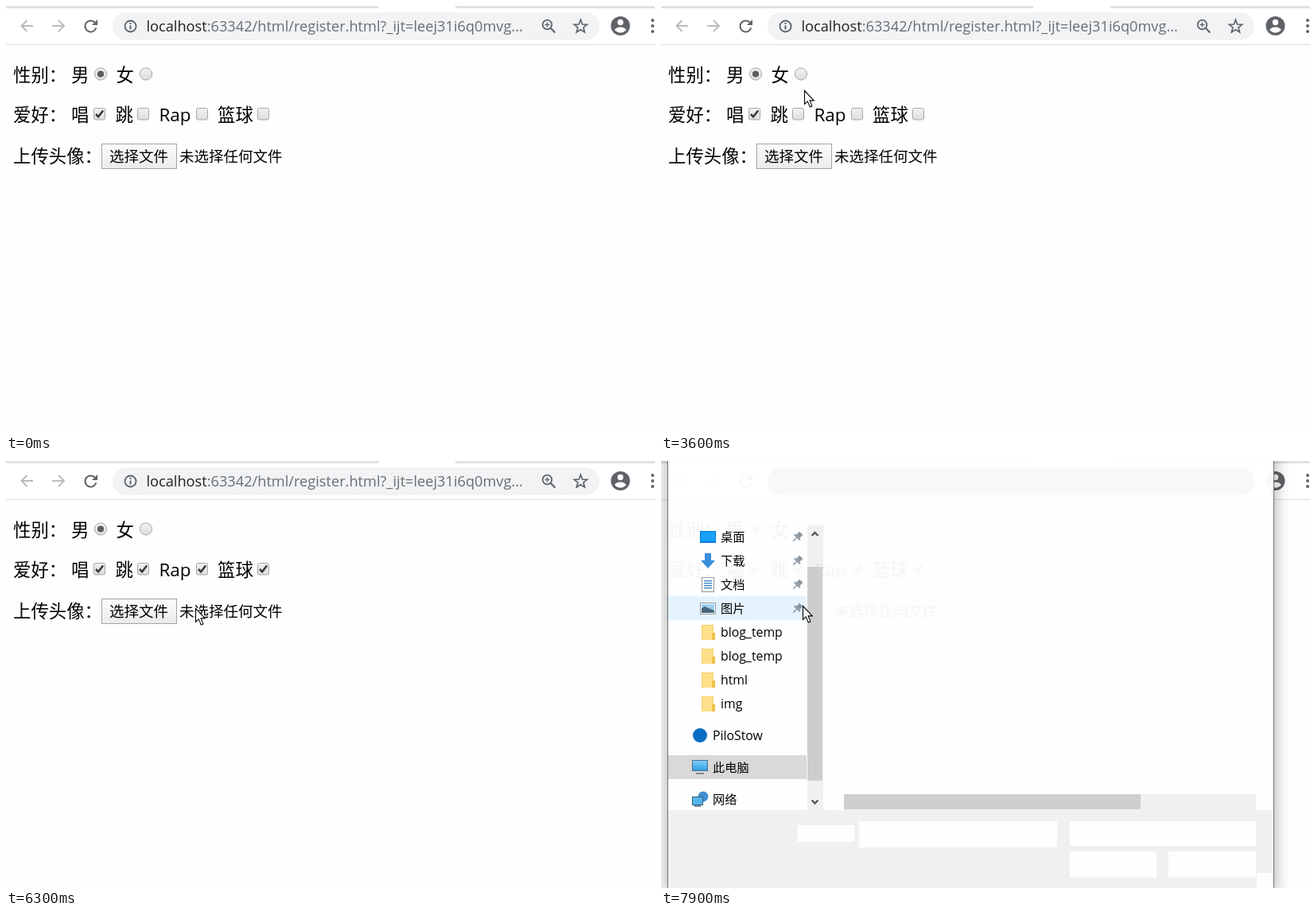
Recreate the animation shown at these times as an HTML page with a canvas. Size 816x537 px, loop 8000 ms.

```html
<!DOCTYPE html>
<html lang="zh-CN">
<head>
<meta charset="utf-8">
<title>Form demo</title>
<style>
  html, body { margin: 0; width: 100%; height: 100%; overflow: hidden; background: #fefefe; }
  canvas { display: block; }
</style>
</head>
<body>
<canvas id="stage" width="816" height="537"></canvas>
<script>
const stage = document.getElementById('stage').getContext('2d');
let ctx = stage;
const FONT = '"Open Sans", "Noto Sans CJK SC", "Noto Sans CJK", sans-serif';
const LOOP = 8000;
const GREY = '#5f6368';

// Pointer waypoints: time, x, y
const path = [
  [700, 804, 13], [800, 620, 45], [900, 435, 80], [1000, 290, 105], [1100, 205, 111],
  [1200, 168, 97], [1500, 169, 87], [2000, 169, 87], [2400, 136, 87], [2700, 119, 86],
  [2800, 119, 86], [3200, 166, 86], [3300, 166, 86], [3700, 184, 113], [4000, 174, 136],
  [4200, 172, 137], [4500, 253, 147], [4800, 247, 137], [5100, 247, 136], [5300, 324, 136],
  [5400, 324, 136], [5600, 320, 134], [6000, 320, 134], [6300, 238, 185], [6600, 178, 182]
];

const lerp = (a, b, k) => a + (b - a) * k;
const ramp = (t, a, b) => Math.max(0, Math.min(1, (t - a) / (b - a)));

function pointerAt(t) {
  if (t < path[0][0]) return null;
  const i = path.findIndex(p => p[0] > t);
  if (i < 0) return path[path.length - 1].slice(1);
  const a = path[i - 1], b = path[i], k = ramp(t, a[0], b[0]);
  return [lerp(a[1], b[1], k), lerp(a[2], b[2], k)].map(Math.round);
}

function rect(x, y, w, h, fill) {
  ctx.fillStyle = fill;
  ctx.fillRect(x, y, w, h);
}

function text(str, x, y, size, fill = '#000') {
  ctx.font = `${size}px ${FONT}`;
  ctx.fillStyle = fill;
  ctx.fillText(str, x, y);
}

function disc(x, y, r, fill) {
  ctx.beginPath();
  ctx.arc(x, y, r, 0, Math.PI * 2);
  ctx.fillStyle = fill;
  ctx.fill();
}

function trace(points, close) {
  ctx.beginPath();
  points.forEach(([x, y]) => ctx.lineTo(x, y));
  if (close) ctx.closePath();
}

function poly(points, fill) {
  trace(points, true);
  ctx.fillStyle = fill;
  ctx.fill();
}

function line(points, color, width = 2) {
  trace(points);
  ctx.strokeStyle = color;
  ctx.lineWidth = width;
  ctx.stroke();
}

function ring(x, y, r, color, width = 2, from = 0, to = Math.PI * 2) {
  ctx.beginPath();
  ctx.arc(x, y, r, from, to);
  ctx.strokeStyle = color;
  ctx.lineWidth = width;
  ctx.stroke();
}

function pill(fill) {
  ctx.beginPath();
  ctx.roundRect(134, 8, 612, 35, 17.5);
  ctx.fillStyle = fill;
  ctx.fill();
}

function shade(y, h, top, bottom) {
  const g = ctx.createLinearGradient(0, y, 0, y + h);
  g.addColorStop(0, top);
  g.addColorStop(1, bottom);
  return g;
}

function drawToolbar() {
  rect(0, 0, 816, 48, '#fff');
  rect(0, 0, 468, 3, '#dee1e6');
  rect(565, 0, 251, 3, '#dee1e6');
  rect(0, 48, 816, 1, '#dadce0');

  line([[34, 25], [20, 25]], '#babcbe');
  line([[26.5, 18], [19.5, 25], [26.5, 32]], '#babcbe');
  line([[58, 25], [72, 25]], '#babcbe');
  line([[66, 18], [73, 25], [66, 32]], '#babcbe');

  ring(106.5, 25.5, 7, GREY, 2, .25, 5.5);
  poly([[115, 17], [115, 24], [108, 24]], GREY);

  pill('#f1f3f4');
  ring(156.5, 25.5, 7, GREY, 1.8);
  rect(155.5, 24.5, 2, 5, GREY);
  rect(155.5, 21, 2, 2, GREY);

  text('localhost', 176.5, 32, 18.2, '#202124');
  const host = ctx.measureText('localhost').width;
  text(':63342/html/register.html?_ijt=leej31i6q0mvg...', 176.5 + host, 32, 18.2, '#6a6e73');

  ring(680.5, 23.5, 5.8, GREY, 1.8);
  line([[685, 28], [690.5, 33.5]], GREY, 2.2);
  line([[677.5, 23.5], [683.5, 23.5]], GREY, 1.4);
  line([[680.5, 20.5], [680.5, 26.5]], GREY, 1.4);

  const star = Array.from({ length: 10 }, (_, i) => {
    const a = i * Math.PI / 5 - Math.PI / 2, r = i % 2 ? 3.7 : 8.6;
    return [722.5 + r * Math.cos(a), 26 + r * Math.sin(a)];
  });
  trace(star, true);
  ctx.strokeStyle = GREY;
  ctx.lineWidth = 1.7;
  ctx.stroke();

  disc(772.5, 25, 12, GREY);
  disc(772.5, 20.5, 3.7, '#fff');
  ctx.beginPath();
  ctx.ellipse(772.5, 30.5, 7.2, 4, 0, Math.PI, 0);
  ctx.quadraticCurveTo(772.5, 37, 765.3, 30.5);
  ctx.fillStyle = '#fff';
  ctx.fill();
  [18, 25, 32].forEach(y => disc(813, y, 2, GREY));
}

function drawRadio(x, on) {
  const y = 85.5;
  disc(x, y, 7.6, shade(y - 8, 16, '#f2f2f2', '#dcdcdc'));
  ring(x, y, 7.6, '#a6a6a6', 1);
  if (on) disc(x, y, 4.1, '#5c5c5c');
}

function drawCheckbox(x, on) {
  ctx.beginPath();
  ctx.roundRect(x - 7, 128.5, 14, 14.5, 2);
  ctx.fillStyle = shade(128, 16, '#f2f2f2', '#dcdcdc');
  ctx.fill();
  ctx.strokeStyle = '#a6a6a6';
  ctx.lineWidth = 1;
  ctx.stroke();
  if (on) line([[x - 4.5, 136], [x - 1.4, 139.3], [x + 4.6, 131.5]], '#3a3a3a', 2.6);
}

function drawForm(t) {
  text('性别：', 9, 94.5, 22.4);
  text('男', 82, 94.5, 22.4);
  text('女', 138.5, 94.5, 22.4);
  const female = t >= 1700 && t < 2600;
  drawRadio(119, !female);
  drawRadio(176, female);

  text('爱好：', 9, 145, 22.4);
  [['唱', 82, 117.5, 0], ['跳', 137.5, 172.5, 4100], ['Rap', 192.5, 246.5, 5000], ['篮球', 266, 323.5, 5800]]
    .forEach(([label, x, box, at]) => {
      text(label, x, 145, 22.4);
      drawCheckbox(box, t >= at);
    });

  text('上传头像：', 9, 196.5, 22.4);
  const pressed = t >= 7100 && t < 7200;
  rect(120, 173, 95, 32, t >= 6500 ? '#939393' : '#a5a5a5');
  rect(121, 174, 93, 30, pressed ? shade(174, 30, '#e2e2e2', '#f0f0f0') : shade(174, 30, '#fbfbfb', '#ebebeb'));
  text('选择文件', 130, 196, 18.5);
  text('未选择任何文件', 218, 196, 18.5);
}

function drawTooltip(t) {
  const k = ramp(t, 6600, 6900);
  if (!k) return;
  ctx.globalAlpha = k;
  rect(194, 202, 121, 31, '#fdfdfd');
  ctx.strokeStyle = '#e2e2e2';
  ctx.lineWidth = 1;
  ctx.strokeRect(194.5, 202.5, 120, 30);
  text('未选择任何文件', 202, 222, 14.6, '#d2d2d2');
  ctx.globalAlpha = 1;
}

function chevron(x, y, dir) {
  line([[x - 4, y + 2 * dir], [x, y - 2 * dir], [x + 4, y + 2 * dir]], '#505050', 2.4);
}

function drawShadow() {
  ctx.save();
  ctx.beginPath();
  ctx.rect(-60, -60, 960, 700);
  ctx.rect(8, -40, 763, 580);
  ctx.clip('evenodd');
  ctx.shadowColor = 'rgba(0,0,0,.36)';
  ctx.shadowBlur = 20;
  ctx.shadowOffsetY = 4;
  rect(8, -40, 763, 580, '#fff');
  ctx.restore();
}

function drawFrame() {
  drawShadow();
  rect(8, -40, 763, 580, '#6e6e6e');
  rect(9, -40, 761, 579, '#fff');
  rect(184, 81, 20, 358, '#f0f0f0');
  rect(184, 133, 19, 269, '#cdcdcd');
  chevron(193.5, 92, 1);
  chevron(193.5, 428.5, -1);
  rect(230, 419, 518, 20, '#f0f0f0');
  rect(230, 419, 373, 19, '#cdcdcd');
  rect(9, 439, 761, 100, '#f0f0f0');
  [[172, 458, 71, 21], [249, 453, 249, 33], [514, 453, 234, 31],
   [514, 491, 109, 33], [638, 491, 110, 33], [749, 518, 21, 21]]
    .forEach(([x, y, w, h]) => rect(x, y, w, h, '#fefefe'));
}

function pin(y) {
  ctx.save();
  ctx.translate(172, y);
  ctx.rotate(Math.PI / 4);
  rect(-3, -6, 6, 6, '#8c969f');
  rect(-5, 0, 10, 2, '#8c969f');
  rect(-.7, 2, 1.4, 6, '#8c969f');
  ctx.restore();
}

const icons = {
  desktop(y) {
    rect(49, y - 7, 20, 15, '#0078d7');
    rect(50, y - 6, 18, 12, '#18a0fb');
  },
  download(y) {
    poly([[55, y - 9], [63, y - 9], [63, y], [68, y], [59, y + 10], [50, y], [55, y]], '#3a8ddb');
  },
  document(y) {
    rect(51, y - 9, 16, 19, '#8b98a3');
    rect(52, y - 8, 14, 17, '#fff');
    [-5, -2, 1, 4].forEach(d => rect(54, y + d, 10, 1.5, '#4a90c8'));
  },
  picture(y) {
    rect(49, y - 7, 20, 15, '#8f9aa3');
    rect(50, y - 6, 18, 13, '#fff');
    rect(51, y - 5, 16, 11, '#9fd0ee');
    poly([[51, y + 6], [51, y], [55, y - 2], [67, y + 3], [67, y + 6]], '#47677c');
  },
  folder(y) {
    rect(51, y - 9, 15, 19, '#f5cf68');
    rect(52, y - 8, 13, 18, '#ffe08a');
    rect(64, y + 1, 4, 9, '#f0c04c');
  },
  cloud(y) {
    disc(49, y, 9, '#0a6cc4');
  },
  computer(y) {
    rect(39, y - 9, 20, 14, '#4a6e8a');
    rect(40, y - 8, 18, 12, shade(y - 8, 12, '#7fd0f8', '#2f9fe3'));
    rect(44, y + 7, 10, 2, '#7d8a94');
  },
  network(y) {
    disc(53, y - 3, 6.5, '#3f8fd0');
    rect(39, y - 3, 14, 11, '#33607f');
    rect(40, y - 2, 12, 9, '#55b6ee');
    rect(42, y + 8, 8, 2, '#7d8a94');
  }
};

const places = [
  ['desktop', '桌面', 95], ['download', '下载', 125], ['document', '文档', 155], ['picture', '图片', 185],
  ['folder', 'blog_temp', 215], ['folder', 'blog_temp', 245], ['folder', 'html', 275], ['folder', 'img', 305],
  ['cloud', 'PiloStow', 345], ['computer', '此电脑', 385], ['network', '网络', 425]
];

function drawPlaces() {
  rect(9, 170, 174, 30, '#e5f3ff');
  rect(9, 370, 174, 30, '#d9d9d9');
  places.forEach(([icon, label, y], i) => {
    icons[icon](y);
    const latin = label.charCodeAt(0) < 128;
    text(label, i < 8 ? 75 : 65, y + 5.5, latin ? 15.8 : 15.2);
    if (i < 4) pin(y);
  });
}

// The window is painted once, then fades and grows as one layer
const MARGIN = 40;
const layer = document.createElement('canvas');
layer.width = 816;
layer.height = 620;

function paintLayer() {
  ctx = layer.getContext('2d');
  ctx.translate(0, MARGIN);
  drawFrame();
  ctx = stage;
}

function drawDialog(t) {
  if (t < 7600) return;
  const scale = lerp(.986, 1, ramp(t, 7600, 7800));
  ctx.save();
  ctx.translate(265, 160);
  ctx.scale(scale, scale);
  ctx.translate(-265, -160);
  ctx.globalAlpha = t < 7700 ? .66 : t < 7800 ? .88 : .955;
  ctx.drawImage(layer, 0, -MARGIN);
  ctx.globalAlpha = 1;
  if (t >= 7800) {
    pill('#f8f8f8');
    rect(184, 133, 19, 269, '#cdcdcd');
    drawPlaces();
  }
  ctx.restore();
}

function drawPointer(t) {
  const p = pointerAt(t);
  if (!p) return;
  ctx.save();
  ctx.translate(p[0] + .5, p[1] + .5);
  poly([[0, 0], [0, 17], [3.8, 13.4], [6.8, 20.6], [9.4, 19.4], [6.6, 12.4], [11.8, 12.4]], '#fff');
  ctx.strokeStyle = '#000';
  ctx.lineWidth = 1.1;
  ctx.stroke();
  ctx.restore();
}

function frame() {
  const t = Math.floor(performance.now() % LOOP / 100) * 100;
  rect(0, 0, 816, 537, '#fefefe');
  drawToolbar();
  drawForm(t);
  drawTooltip(t);
  drawDialog(t);
  drawPointer(t);
  requestAnimationFrame(frame);
}

paintLayer();
frame();
</script>
</body>
</html>
```
